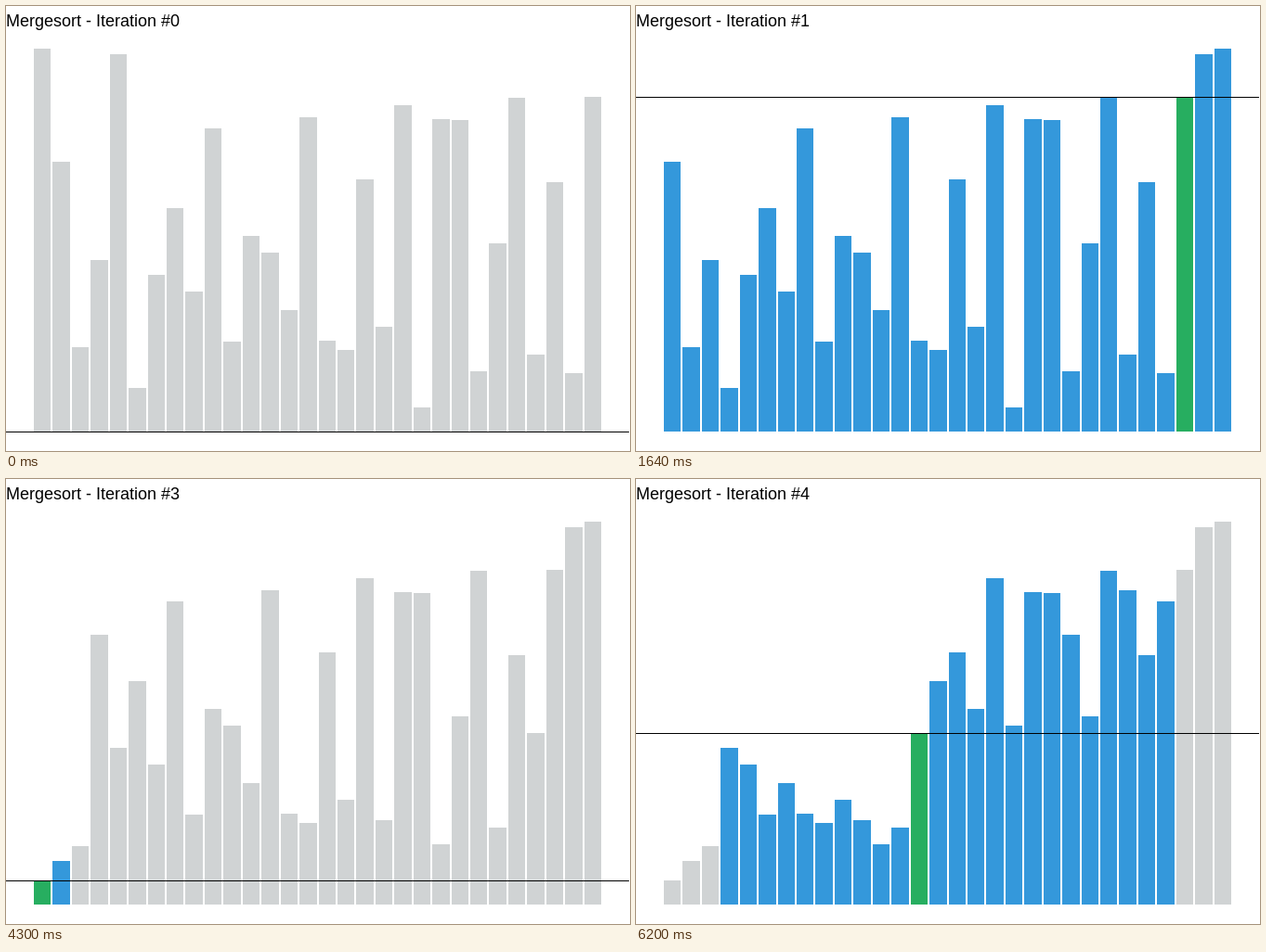
Recreate the animation shown at these times as an HTML page. Size 672x480 px, loop 8000 ms.

```html
<!DOCTYPE html>
<html lang="en">
<head>
<meta charset="utf-8">
<title>Mergesort</title>
<style>
  html, body { margin: 0; width: 100%; height: 100%; overflow: hidden; background: #fff; }
  svg { display: block; width: 672px; height: 480px; }
  text { font: 18px "Liberation Sans", Arial, sans-serif; fill: #000; }
  rect { shape-rendering: crispEdges; }
</style>
</head>
<body>
<svg viewBox="0 0 672 480">
  <text x="0" y="22" id="title"></text>
  <g id="bars"></g>
  <rect id="level" x="0" width="671" height="1" fill="#000"/>
</svg>
<script>
const LOOP = 8000;
const BASE = 459;
const GREY = '#d0d3d4', BLUE = '#3498db', GREEN = '#27ae60';

// Top edge of each bar; a smaller number is a taller bar.
const tops = [46, 168, 368, 274, 52, 412, 290, 218, 308, 132,
              362, 248, 266, 328, 120, 361, 371, 187, 346, 107,
              433, 122, 123, 394, 256, 99, 376, 190, 396, 98];
const count = tops.length;

// Partition list[lo..hi] around its last bar; returns where that bar lands.
function partition(list, lo, hi) {
  const swap = (a, b) => { [list[a], list[b]] = [list[b], list[a]]; };
  let store = lo;
  for (let i = lo; i < hi; i++) {
    if (list[i] > list[hi]) swap(store++, i);
  }
  swap(store, hi);
  return store;
}

// Each step records the bars, the active range and the pivot.
const steps = [{ start: 0, list: tops.slice(), lo: 0, hi: -1, pivot: -1 }];

function sort(list, lo, hi) {
  const start = 500 + 1900 * (steps.length - 1);
  if (lo >= hi || start >= LOOP) return;
  const pivot = partition(list, lo, hi);
  steps.push({ start, list: list.slice(), lo, hi, pivot });
  sort(list, lo, pivot - 1);
  sort(list, pivot + 1, hi);
}
sort(tops.slice(), 0, count - 1);

const title = document.getElementById('title');
const level = document.getElementById('level');
const group = document.getElementById('bars');
const left = i => Math.round(30.055 + 20.43 * i);

const bars = tops.map((_, i) => {
  const bar = document.createElementNS('http://www.w3.org/2000/svg', 'rect');
  bar.setAttribute('x', left(i));
  bar.setAttribute('width', left(i + 1) - left(i) - 2);
  return group.appendChild(bar);
});

function colour(step, i) {
  if (i === step.pivot) return GREEN;
  return i >= step.lo && i <= step.hi ? BLUE : GREY;
}

let shown = -1;

function draw(time) {
  const n = steps.filter(s => s.start <= time).length - 1;
  if (n === shown) return;
  shown = n;
  const step = steps[n];
  title.textContent = `Mergesort - Iteration #${n}`;
  bars.forEach((bar, i) => {
    bar.setAttribute('y', step.list[i]);
    bar.setAttribute('height', BASE - step.list[i]);
    bar.setAttribute('fill', colour(step, i));
  });
  level.setAttribute('y', step.pivot < 0 ? BASE : step.list[step.pivot]);
}

const begin = performance.now();
function tick() {
  draw((performance.now() - begin) % LOOP);
  requestAnimationFrame(tick);
}
tick();
</script>
</body>
</html>
```
